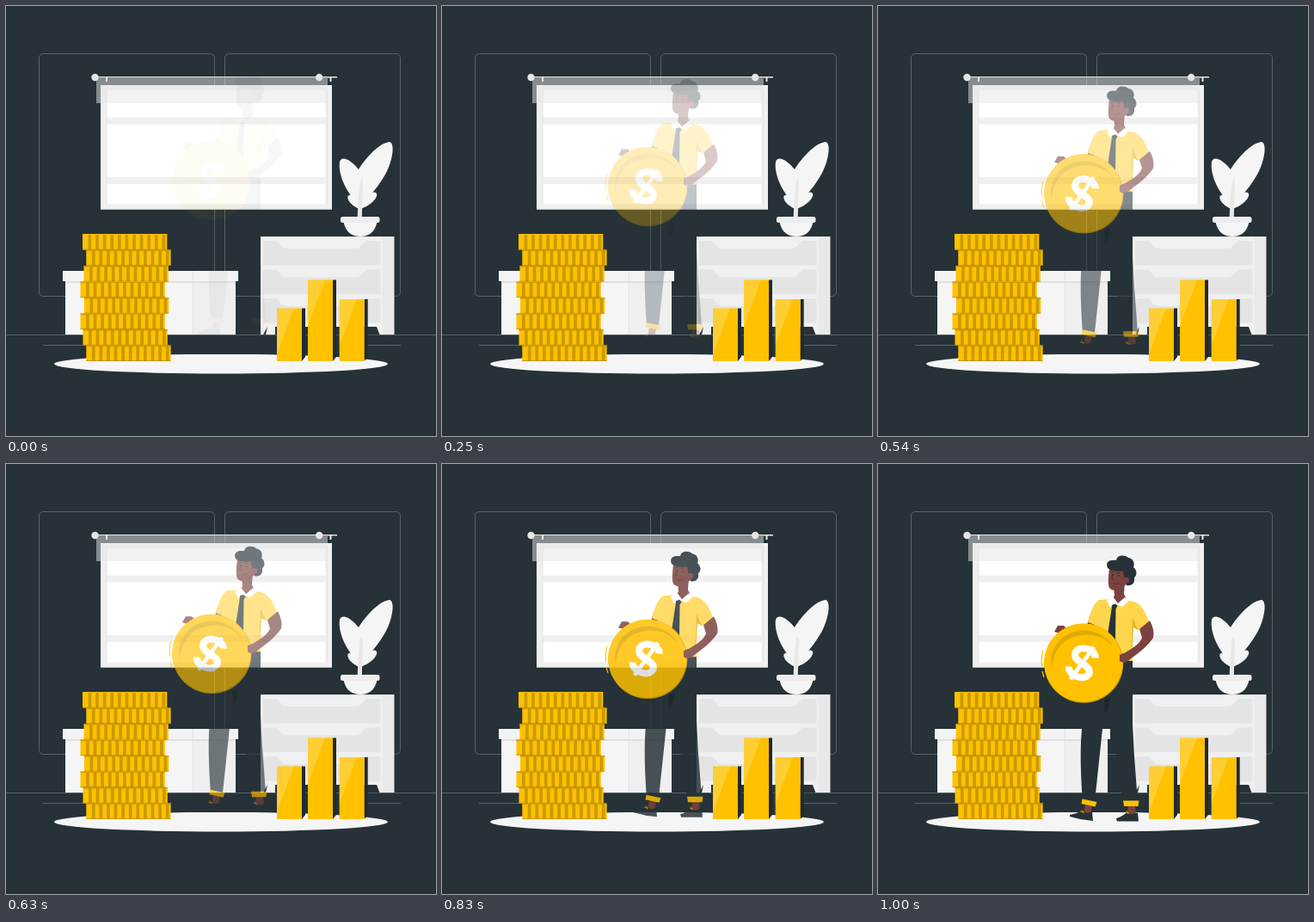
Write an HTML page that moves like this. It is 500 px wide and 500 px high and loops after 1040 ms.

```html
<!DOCTYPE html>
<html lang="en">
<head>
<meta charset="utf-8">
<title>Man with a coin</title>
<style>
html, body { margin: 0; width: 100%; height: 100%; overflow: hidden; background: #263238; }
svg { display: block; width: 100vw; height: 100vh; }
.line { fill: none; stroke: #657074; stroke-width: .8; }
.dark { fill: #263238; }
.gold { fill: #ffc100; }
.shirt { fill: #ffd54d; }
.skin { fill: #7a433f; }
</style>
</head>
<body>
<svg viewBox="0 0 500 500">
  <g class="line">
    <rect x="38.5" y="55.5" width="204" height="282" rx="5"/>
    <rect x="254.5" y="55.5" width="204" height="282" rx="5"/>
    <path d="M0 382.5H500M43 394.5H93M420 394.5H459"/>
  </g>

  <!-- screen -->
  <path d="M110 92H379V236.500H110Z" fill="#f0f0f0"/>
  <path d="M117 98H371V129.500H117ZM117 137.500H371V199H117ZM117 207H371V230.500H117Z" fill="#fff"/>
  <path d="M117 97V231M373.500 97V231M110 236H379" stroke="#e4e4e4" fill="none"/>
  <path d="M105 84H374V113H105Z" fill="#e6e6e6" opacity=".5"/>
  <path d="M100 82.700H385" stroke="#e8e8e8" stroke-width="1.600"/>
  <path d="M117 83V88M377.500 83V88" stroke="#e8e8e8" stroke-width="2"/>
  <g fill="#e6e6e6"><circle cx="103.500" cy="83" r="4.200"/><circle cx="364.200" cy="83" r="4.200"/></g>

  <!-- box -->
  <path d="M69 319H267V382H69Z" fill="#f5f5f5"/>
  <path d="M217.500 319H267V382H217.500Z" fill="#efefef"/>
  <path d="M69 320H267V322H69Z" fill="#dfdfdf"/>
  <path d="M66 308H270V320H66Z" fill="#f3f3f3"/>
  <path d="M217.500 308V382" stroke="#e2e2e2"/>

  <!-- cabinet -->
  <path d="M296 268H438V382H296Z" fill="#f0f0f0"/>
  <path d="M437.500 268H451.500V382H437.500Z" fill="#e9e9e9"/>
  <path d="M296 268.500H451" stroke="#e0e0e0"/>
  <g id="drawers"></g>
  <path class="dark" d="M313 373H431L434.500 382.200H313ZM302 382.200 304 373 299 382.200Z"/>

  <!-- plant -->
  <g fill="#f5f5f5">
    <path d="M411 231C394 216 386 194 388 181C391 173 402 180 410 190C418 177 434 159 446 158C453 160 449 181 442 194C434 209 423 222 411 231Z"/>
    <path d="M411 236C403 233 396 226 397.500 221C401 217 407 221 411 227C417 221 426 213 431 218C433 224 421 234 411 236Z"/>
  </g>
  <path d="M408.700 246 409.500 225 412 203Q414 199 415 203L413.800 246Z" fill="#e8e8e8"/>
  <path d="M392.500 251H431.500C429 263 422 268 412 268S395 263 392.500 251Z" fill="#f5f5f5"/>
  <rect x="389" y="245" width="45.500" height="7" rx="2.500" fill="#ededed"/>

  <ellipse cx="250" cy="416.200" rx="194" ry="11.300" fill="#f5f5f5"/>
  <g id="stack"></g>
  <g id="bars"></g>

  <g id="man">
    <!-- feet -->
    <path class="skin" d="M241 396 249 397 247 408 239 406ZM291 397H299L300 408H290Z"/>
    <path class="dark" d="M223 408Q232 406 238 403L243 406 249 404.500 250 415Q236 414 223 410ZM277 412Q286 409 289 405L294 407.500 302 405.500 303 415.500H278Z"/>
    <path d="M235 404 240 405M237 402 239 406M288 405 292 406M289 403 291 407" stroke="#ffc100" stroke-width=".7"/>

    <!-- trousers -->
    <path class="dark" d="M244 225 296 227 296 303 298 340 302 393H285L277 337 270 296 261 308 252 393H238C235 350 235 323 238 300Z"/>
    <path d="M263 274 270 271 269 281 264 290Z" fill="#1d272c"/>
    <path class="gold" d="M237.500 389.500 254.500 393 252.500 398.500 236.500 395ZM285 391.500H303.500L302.500 398H286Z"/>

    <!-- body -->
    <path class="skin" d="M246 177 253 182 250 192 242 191Z"/>
    <path class="shirt" d="M244 184C247 171 252 161 257 158L271 157 290 159C302 159 309 165 316 186L302 193 297 189 296 229H250L252 187Z"/>
    <path d="M296 178 302 193 297 190 294 220Z" fill="#e4b52a"/>
    <path class="skin" d="M304 192 316 182Q322 193 320 202C313 213 300 222 293 227Q289 232 282 230L280 223 288 219C297 214 305 208 307 202Z"/>
    <path class="skin" d="M274 142 287 136 286 151 289 158 279 164 272 158 275 153Z"/>
    <path d="M273 154 266 159 270 167 276 163 284 166 291 160 287 155 279 162Z" fill="#fff"/>
    <path class="dark" d="M272 164 276 162.500 278.500 165 276.500 168.500 276 205H266L271.500 169Z"/>

    <!-- head -->
    <path class="skin" d="M269 121C268 130 267 139 269 144C273 149 283 147 287 141L292 139 294 126 287 118Z"/>
    <path class="dark" d="M267 121C264 114 269 111 277 112C278 106 286 105 291 109C297 110 299 116 297 120C302 124 301 130 298 132C299 139 295 142 289 141L290 133C286 137 286 129 285 124C279 126 271 124 267 121Z"/>
    <circle class="skin" cx="289" cy="135" r="3.300"/>
    <g fill="none" stroke="#263238" stroke-width=".9">
      <path d="M271 126 274 125M278 126 281 127"/>
      <path d="M273 129 271.500 134H274M274 139Q278 141 281 138" stroke="#4e2724"/>
    </g>
    <g class="dark"><circle cx="273" cy="129" r=".9"/><circle cx="280" cy="130" r=".9"/></g>

    <!-- coin -->
    <path class="skin" d="M205 195 209 188 216 188 220 192 215 198Z"/>
    <path d="M192 217Q189 226 191 235M191 241 193 248" fill="none" stroke="#ffc100" stroke-width="1.300"/>
    <circle cx="239.300" cy="231.800" r="46" fill="#d9a400"/>
    <circle class="gold" cx="238.700" cy="231" r="45.500"/>
    <path d="M202 238C196 205 229 184 258 198Q269 203 274 214C264 199 246 196 231 200C213 204 203 220 202 238Z" fill="#e0aa00"/>
    <g transform="translate(237.500 231.500) rotate(16)" fill="none" stroke="#fff">
      <path d="M13 -10C11 -20 -10 -20 -11 -9C-11 3 11 -2 11 9C10 20 -12 19 -14 8" stroke-width="8"/>
      <path d="M8 -22 -8 22" stroke-width="4.500"/>
    </g>
    <path class="skin" d="M281 222Q288 218 293 222L292 228Q285 233 281 229Z"/>
  </g>
</svg>
<script>
const LOOP = 1040, STEPS = 25, DROP = 30;
const man = document.getElementById('man');

const fill = (id, parts) => { document.getElementById(id).innerHTML = parts.join(''); };
const path = (d, color, extra = '') => `<path d="${d}" fill="${color}" ${extra}/>`;
const box = (x, y, w, h, color) => path(`M${x} ${y}h${w}v${h}h${-w}Z`, color);

fill('drawers', [273, 306.5, 340].map(y =>
  path(`M299 ${y}H314L321 ${y + 7}Q323 ${y + 9} 326 ${y + 9}H407Q410 ${y + 9} 412 ${y + 7}L419 ${y}H435.5V${y + 28.5}H299Z`, '#e4e4e4')));

fill('stack', [89, 93.3, 90.5, 86.5, 91, 86.5, 89.5, 93.3].map((x, i) => {
  const y = 265 + i * 18.5;
  let coin = box(x, y, 98.3, 18.5, '#ffc100');
  for (let k = 0; k < 11; k++) coin += box(x + 6.5 + k * 8.6, y + 1, 3.8, 17.5, '#cc9a00');
  return coin + box(x, y + 17.7, 98.3, .8, '#b88b00') + (i ? box(x, y, 98.3, 1.6, '#cc9a00') : '');
}));

fill('bars', [[315, 351.5], [351, 318.5], [387.7, 341]].map(([x, y]) =>
  path(`M${x + 29} ${y}h4V408l-4 5Z`, '#20292e') +
  box(x, y, 29, 413 - y, '#ffc100') +
  path(`M${x} ${y}h20L${x} ${y + 54}Z`, '#fff', 'opacity=".2"')));

function draw(now) {
  const t = now % LOOP;
  const step = Math.min(STEPS - 1, Math.floor((t + 5) / (LOOP / STEPS)));
  const shown = (step + 1) / STEPS;
  man.setAttribute('opacity', shown);
  man.setAttribute('transform', `translate(0 ${-DROP * (1 - shown)})`);
  requestAnimationFrame(() => draw(performance.now()));
}
draw(0);
</script>
</body>
</html>
```
